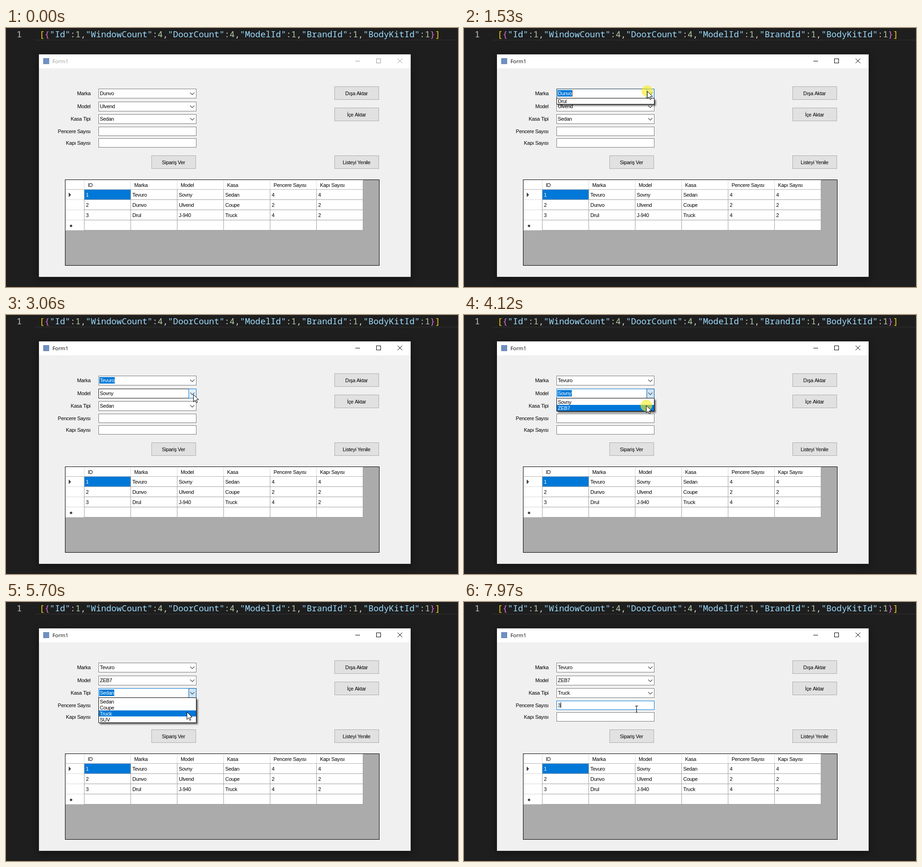
Recreate the animation shown at these times as an HTML page with a canvas. Size 973 by 559 pixels, loop 8 s.

```html
<!DOCTYPE html>
<html lang="tr">
<head>
<meta charset="utf-8">
<style>
html, body { margin: 0; width: 100%; height: 100%; overflow: hidden; background: #1e1e1e; }
canvas { display: block; }
</style>
</head>
<body>
<canvas id="stage" width="973" height="559"></canvas>
<script>
const ctx = document.getElementById('stage').getContext('2d');
const LOOP = 8000;
const UI = '11px "Liberation Sans", sans-serif';
const TITLE = '11.3px "Open Sans", sans-serif';
const CODE = '18.46px "Noto Sans Mono", monospace';
const BLUE = [0, 120, 215];
const SELECTED = '#0078d7';
const SLIDE = 190, FADE = 200, BLINK = 530, ROW = 13;

const ACTIVATE = 1470, TEXT_FOCUS = 7150, TYPED = 7900;
const json = '[{"Id":1,"WindowCount":4,"DoorCount":4,"ModelId":1,"BrandId":1,"BodyKitId":1}]';

const columns = ['ID', 'Marka', 'Model', 'Kasa', 'Pencere Sayısı', 'Kapı Sayısı'];
const orders = [
  ['1', 'Tevuro', 'Sovny', 'Sedan', '4', '4'],
  ['2', 'Dunvo', 'Ulvend', 'Coupe', '2', '2'],
  ['3', 'Drul', 'J-940', 'Truck', '4', '2'],
];

// values: [time, text]; look: [time, state]
const combos = [
  { y: 131, items: ['Tevuro', 'Dunvo', 'Drul'], open: 1470, close: 2400, blur: 3140,
    values: [[0, 'Dunvo'], [2400, 'Tevuro']],
    look: [[-FADE, 0], [1230, 1], [1470, 2], [2550, 0]] },
  { y: 159, items: ['Sovny', 'ZEB7'], open: 3140, close: 4200, blur: 5125,
    values: [[0, 'Ulvend'], [2400, 'Sovny'], [4200, 'ZEB7']],
    look: [[-FADE, 0], [2840, 1], [3140, 2], [4450, 0]] },
  { y: 186, items: ['Sedan', 'Coupe', 'Truck', 'SUV'], open: 5125, close: 6000, blur: TEXT_FOCUS,
    values: [[0, 'Sedan'], [6000, 'Truck']],
    look: [[-FADE, 0], [4750, 1], [5125, 2], [6450, 0]] },
];

// Border, button fill and button edge for: normal, hot, pressed
const looks = [
  [[122, 122, 122], [255, 255, 255], [255, 255, 255]],
  [[23, 23, 23], [229, 241, 251], BLUE],
  [BLUE, [204, 228, 247], [0, 84, 153]],
];

const pointerPath = [
  [530, 944, 472], [720, 915, 270], [900, 790, 68], [1120, 500, 100], [1330, 394, 136],
  [1860, 394, 136], [2190, 388, 160], [2480, 388, 160], [2980, 403, 171],
  [3460, 403, 171], [3920, 392, 195], [4300, 392, 195], [4860, 399, 199],
  [5300, 399, 199], [5720, 389, 237], [6700, 389, 237], [7080, 371, 224],
];
const clicks = [[1430, 1630], [2330, 2460], [3190, 3300], [4120, 4260], [5060, 5260], [5860, 6020], [7150, 7830]];

const clamp = v => Math.max(0, Math.min(1, v));
const lerp = (a, b, k) => a + (b - a) * k;
const mix = (a, b, k) => `rgb(${a.map((v, i) => Math.round(lerp(v, b[i], k)))})`;
const lastBefore = (list, t) => list.reduce((found, item) => item[0] <= t ? item : found);

function rect(x, y, w, h, fill, edge) {
  ctx.fillStyle = fill;
  ctx.fillRect(x, y, w, h);
  if (edge) {
    ctx.strokeStyle = edge;
    ctx.lineWidth = 1;
    ctx.strokeRect(x + .5, y + .5, w - 1, h - 1);
  }
}

function poly(points, stroke, width = 1) {
  ctx.beginPath();
  points.forEach(([x, y]) => ctx.lineTo(x, y));
  if (stroke) {
    ctx.strokeStyle = stroke;
    ctx.lineWidth = width;
    ctx.stroke();
  }
}

function text(str, x, y, color = '#000', align = 'left', font = UI) {
  ctx.font = font;
  ctx.letterSpacing = font === UI ? '-0.3px' : '0px';
  ctx.textAlign = align;
  ctx.fillStyle = color;
  ctx.fillText(str, x, y);
}

function drawEditor() {
  rect(0, 0, 973, 559, '#1e1e1e');
  rect(62, 25, 911, 2, '#282828');
  text('1', 23, 20, '#c6c6c6', 'left', CODE);
  let x = 72;
  for (const token of json.match(/"\w+"|\d|./g)) {
    const color = /^"/.test(token) ? '#9cdcfe' : /\d/.test(token) ? '#b5cea8'
      : /[[\]]/.test(token) ? '#ffd700' : /[{}]/.test(token) ? '#da70d6' : '#d4d4d4';
    text(token, x, 20, color, 'left', CODE);
    x += ctx.measureText(token).width;
  }
}

function drawWindow(t) {
  const active = clamp((t - ACTIVATE + 60) / 60);
  const ink = mix([153, 153, 153], [0, 0, 0], active);
  ctx.save();
  ctx.shadowColor = 'rgba(0,0,0,.4)';
  ctx.shadowBlur = 14;
  ctx.shadowOffsetY = 4;
  rect(70, 56, 802, 482, mix([60, 60, 60], [40, 40, 40], active));
  ctx.restore();
  rect(71, 57, 800, 30, '#fff');
  rect(71, 87, 800, 450, '#f0f0f0');
  rect(80, 65, 13, 13, '#6f8fc0');
  text('Form1', 100, 76, ink, 'left', TITLE);
  rect(752, 71, 10, 1, ink);
  rect(797, 66, 10, 10, '#fff', ink);
  poly([[843, 66], [853, 76]], ink);
  poly([[853, 66], [843, 76]], ink);
}

function drawButton(label, x, y) {
  rect(x, y, 96, 29, '#e1e1e1', '#adadad');
  text(label, x + 47.5, y + 19, '#000', 'center');
}

function drawForm(t) {
  const labels = ['Marka', 'Model', 'Kasa Tipi', 'Pencere Sayısı', 'Kapı Sayısı'];
  [145, 173, 200, 227, 252].forEach((y, i) => text(labels[i], 182, y, '#000', 'right'));
  drawButton('Dışa Aktar', 707, 126);
  drawButton('İçe Aktar', 707, 172);
  drawButton('Listeyi Yenile', 707, 275);
  drawButton('Sipariş Ver', 313, 275);

  const focused = t >= TEXT_FOCUS;
  const hovered = t >= 6850;
  rect(199, 213, 211, 20, '#fff', focused ? SELECTED : hovered ? '#171717' : '#7a7a7a');
  rect(199, 238, 211, 20, '#fff', '#7a7a7a');
  const typed = t >= TYPED;
  if (typed) text('3', 202, 227);
  if (focused && Math.floor((t - (typed ? TYPED : TEXT_FOCUS)) / BLINK) % 2 === 0)
    rect(typed ? 208 : 202, 216, 1, 13, '#000');
}

function drawGrid() {
  rect(127, 327, 677, 186, '#ababab', '#000');
  rect(128, 328, 641, 109, '#fff');
  rect(169, 349, 99, 21, SELECTED);
  for (let i = 0; i < 5; i++) rect(129, 348 + i * 22, 640, 1, i ? '#a0a0a0' : '#b4b4b4');
  for (let i = 1; i < 5; i++) rect(129, 348 + i * 22, 39, 1, '#d8d8d8');
  columns.forEach((name, i) => {
    const x = 168 + i * 100;
    rect(x, 329, 1, 19, '#dcdcdc');
    rect(x, 348, 1, 89, '#a0a0a0');
    text(name, x + 8, 343);
    orders.forEach((order, row) =>
      text(order[i], x + 4, 364 + row * 22, row || i ? '#000' : '#fff'));
  });
  rect(768, 329, 1, 108, '#a0a0a0');
  poly([[135, 355], [140, 360], [135, 365]]);
  ctx.fillStyle = '#404040';
  ctx.fill();
  ctx.beginPath();
  ctx.arc(140, 427, 2.6, 0, 7);
  ctx.fill();
}

function drawCombo(combo, t) {
  const { y, look } = combo;
  const index = look.indexOf(lastBefore(look, t));
  const [since, state] = look[index];
  const previous = looks[index ? look[index - 1][1] : 0];
  const [border, fill, edge] = looks[state].map((c, i) => mix(previous[i], c, clamp((t - since) / FADE)));
  const value = lastBefore(combo.values, t)[1];
  const focused = t >= combo.open && t < combo.blur;

  rect(199, y, 211, 21, '#fff', border);
  if (index) {
    const idle = state === 0 && t - since >= FADE;
    if (!idle) rect(393, y, 17, 21, fill, edge);
  }
  poly([[396.5, y + 8.5], [401, y + 13], [405.5, y + 8.5]], '#444', 1.1);
  text(value, 202, y + 14);
  if (focused) {
    const width = Math.round(ctx.measureText(value).width) + 1;
    rect(201, y + 3, width + 1, 14, SELECTED);
    text(value, 202, y + 14, '#fff');
    if (Math.floor((t - combo.open) / BLINK) % 2 === 0)
      rect(202 + width, y + 3, 1, 14, '#ff8728');
  }
}

function drawList(combo, t, pointer) {
  if (t < combo.open || t >= combo.close) return;
  const { items } = combo;
  const top = combo.y + 21;
  const full = items.length * ROW + 2;
  const height = Math.round(full * clamp((t - combo.open) / SLIDE));
  if (height < 2) return;
  const under = Math.floor((pointer.y - top - 1) / ROW);
  const current = under >= 0 ? under : items.indexOf(lastBefore(combo.values, t)[1]);

  ctx.save();
  ctx.shadowColor = 'rgba(0,0,0,.55)';
  ctx.shadowBlur = 3;
  ctx.shadowOffsetX = ctx.shadowOffsetY = 3;
  rect(199, top, 211, height, '#fff');
  ctx.restore();
  ctx.save();
  ctx.beginPath();
  ctx.rect(199, top, 211, height);
  ctx.clip();
  items.forEach((item, i) => {
    const y = top + height - full + 1 + i * ROW;
    if (i === current) rect(200, y, 209, ROW, SELECTED);
    text(item, 202, y + 11, i === current ? '#fff' : '#000');
  });
  ctx.restore();
  ctx.strokeStyle = '#000';
  ctx.lineWidth = 1;
  ctx.strokeRect(199.5, top - .5, 210, height);
}

function pointerAt(t) {
  const next = pointerPath.findIndex(p => p[0] > t);
  if (next < 0) {
    const [, x, y] = pointerPath[pointerPath.length - 1];
    return { x, y };
  }
  if (!next) return { x: -50, y: -50 };
  const a = pointerPath[next - 1], b = pointerPath[next];
  let k = (t - a[0]) / (b[0] - a[0]);
  if (t > 1330) k = k * k * (3 - 2 * k);
  return { x: lerp(a[1], b[1], k), y: lerp(a[2], b[2], k) };
}

function drawPointer({ x, y }, t) {
  if (clicks.some(([from, to]) => t >= from && t < to)) {
    ctx.fillStyle = 'rgba(247,236,30,.62)';
    ctx.beginPath();
    ctx.arc(x + .5, y + .5, 12.5, 0, 7);
    ctx.fill();
  }
  ctx.save();
  ctx.translate(Math.round(x), Math.round(y));
  if (t > 6800 && y < 233) {
    rect(0, 0, 1, 14, '#000');
    rect(-3, 0, 7, 1, '#000');
    rect(-1, 13, 3, 1, '#000');
  } else {
    poly([[.5, .5], [.5, 16.5], [4.2, 13], [6.7, 18.5], [9, 17.5], [6.6, 12], [11.7, 11.7]]);
    ctx.closePath();
    ctx.fillStyle = '#fff';
    ctx.fill();
    ctx.strokeStyle = '#000';
    ctx.lineWidth = 1;
    ctx.stroke();
  }
  ctx.restore();
}

function draw(t) {
  const pointer = pointerAt(t);
  drawEditor();
  drawWindow(t);
  drawForm(t);
  drawGrid();
  combos.forEach(combo => drawCombo(combo, t));
  combos.forEach(combo => drawList(combo, t, pointer));
  drawPointer(pointer, t);
}

const start = performance.now();
function tick() {
  draw((performance.now() - start) % LOOP);
  requestAnimationFrame(tick);
}
tick();
</script>
</body>
</html>
```
